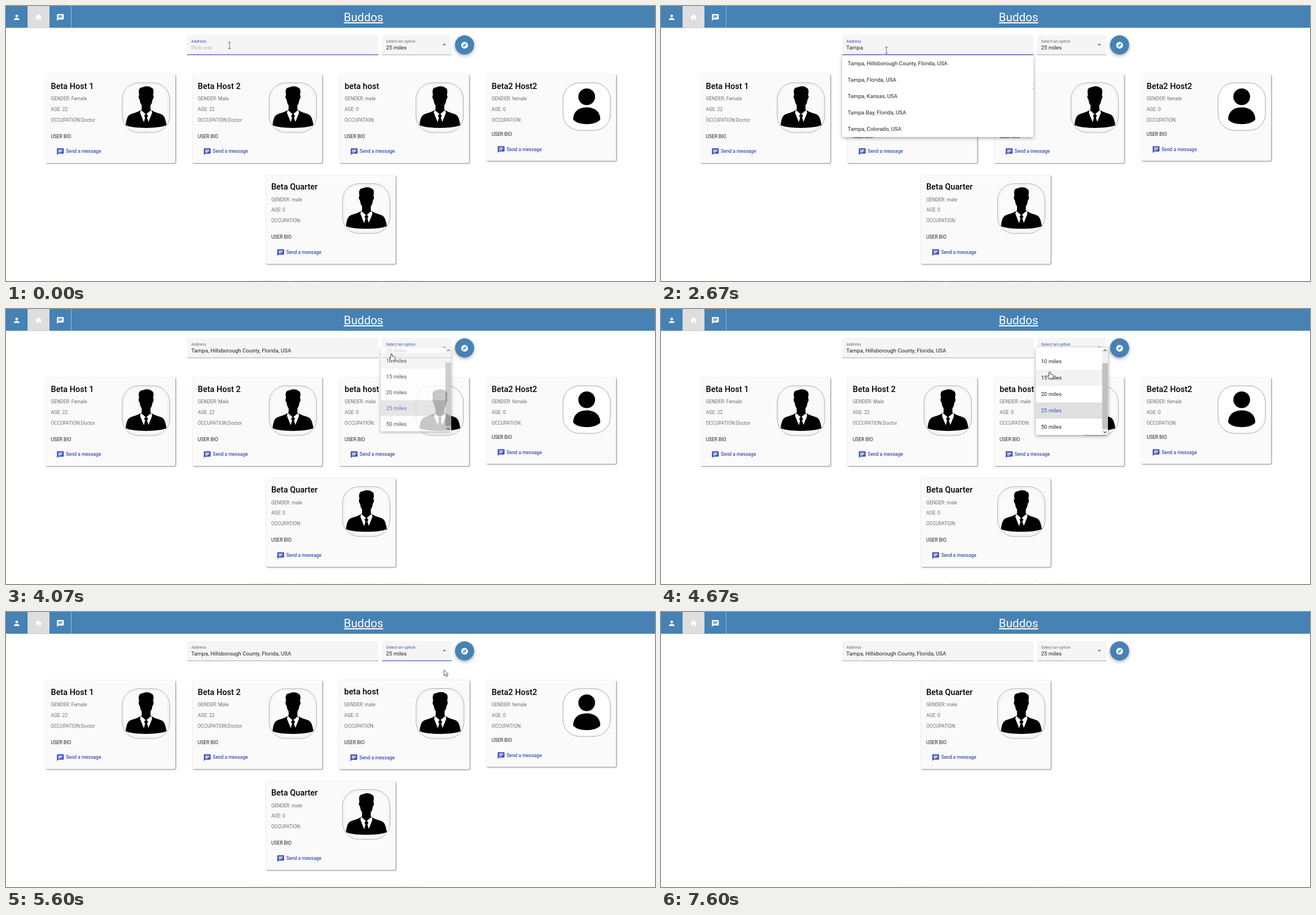
Animation, 1150 px wide and 487 px high, one loop 8190 ms. Source, as an HTML page:

```html
<!DOCTYPE html>
<html lang="en">
<head>
<meta charset="utf-8">
<title>Buddos</title>
<style>
  html, body { margin: 0; width: 100%; height: 100%; overflow: hidden; background: #fff; }
  svg { display: block; font-family: Roboto, sans-serif; }
  text { white-space: pre; }
  .card-bg { filter: drop-shadow(1px 1px 1px rgba(0,0,0,.5)); }
  .raised { filter: drop-shadow(0 2px 3px rgba(0,0,0,.35)); }
</style>
</head>
<body>
<svg id="stage" width="1150" height="487" viewBox="0 0 1150 487">
  <defs>
    <path id="person" d="M12 12c2.21 0 4-1.79 4-4s-1.79-4-4-4-4 1.79-4 4 1.79 4 4 4zm0 2c-2.67 0-8 1.34-8 4v2h16v-2c0-2.66-5.33-4-8-4z"/>
    <path id="home" d="M10 20v-6h4v6h5v-8h3L12 3 2 12h3v8z"/>
    <path id="chat" d="M20 2H4c-1.1 0-2 .9-2 2v18l4-4h14c1.1 0 2-.9 2-2V4c0-1.1-.9-2-2-2zM6 9h12v2H6V9zm8 5H6v-2h8v2zm4-6H6V6h12v2z"/>
    <path id="compass" d="M12 10.9a1.1 1.1 0 1 0 0 2.2 1.1 1.1 0 0 0 0-2.2zM12 2a10 10 0 1 0 0 20 10 10 0 0 0 0-20zm2.19 12.19L6 18l3.81-8.19L18 6l-3.81 8.19z"/>
    <g id="suit">
      <path d="M30 22C28 13 30 8 36 8C41 5 50 6 52 9C56 10 56 16 54.5 22C56.5 23 55.5 28 53.5 30C53 35 51.5 38 50 40V47C55 52 63 53 70 56C76 59 77 68 78.5 75C64 81.5 20 81.5 6 75C7 68 8 59 14 56C21 53 29 52 34.5 47V40C33 38 31.5 35 31 30C29 28 28 23 30 22Z"/>
      <path d="M33 48L42 56L51.5 48L53 53L43 78H41.5L31.5 53Z" fill="#fff"/>
      <path d="M42.3 54.5L45.8 58L44 62L47.5 72L42.3 79L37.5 72L40.5 62L38.8 58Z"/>
    </g>
    <g id="plain">
      <circle cx="42" cy="24.7" r="14.8"/>
      <path d="M18 65C18 51 28 43.5 42 43.5S66 51 66 65C58 76 26 76 18 65Z"/>
    </g>
  </defs>
  <g id="page"></g>
  <g id="addressList" font-size="9.67"></g>
  <g id="menu" font-size="9.67"></g>
  <g id="pointer">
    <path id="arrow" d="M0 0V10.5L2.5 8.3L4.2 12L6 11.2L4.3 7.6H7.6Z" fill="#fff" stroke="#222" stroke-width=".8"/>
    <path id="hand" d="M-1.2 1Q0 -1 1.2 1V4.5L5.5 5.5Q7 6 6.7 8.5L5.5 13H0L-3.8 8Q-3.5 6-1.2 8Z" fill="#fff" stroke="#222" stroke-width=".9"/>
    <path id="beam" d="M-2.3 -5.5H2.3M0 -5.5V5.5M-2.3 5.5H2.3" stroke="#444" stroke-width=".8"/>
  </g>
</svg>
<script>
const LOOP = 8190, STEP = 1000 / 15;
const BLUE = '#3f51b5', STEEL = '#4682b4', INK = 'rgba(0,0,0,.87)', GREY = 'rgba(0,0,0,.56)';
const PLACE = 'Tampa, Hillsborough County, Florida, USA';
const $ = id => document.getElementById(id);
const set = (id, attrs) => { for (const k in attrs) $(id).setAttribute(k, attrs[k]); };
const show = (id, on) => $(id).style.display = on ? '' : 'none';

const text = (x, y, s, size, fill = INK, more = '') =>
  `<text x="${x}" y="${y}" font-size="${size}" fill="${fill}" ${more}>${s}</text>`;
const rect = (x, y, w, h, fill, more = '') =>
  `<rect x="${x}" y="${y}" width="${w}" height="${h}" fill="${fill}" ${more}/>`;
const icon = (name, cx, cy, fill) =>
  `<use href="#${name}" transform="translate(${cx - 7.25} ${cy - 7.25}) scale(.604)" fill="${fill}"/>`;

const CARD_W = 230;
const cards = [
  { x: 70, y: 121, name: 'Beta Host 1', gender: 'Female', age: 22, job: 'Doctor' },
  { x: 330.3, y: 121, name: 'Beta Host 2', gender: 'Male', age: 22, job: 'Doctor' },
  { x: 590.6, y: 121, name: 'beta host', gender: 'male', age: 0, job: '' },
  { x: 851, y: 121, name: 'Beta2 Host2', gender: 'female', age: 0, job: '', plain: true },
  { x: 460.4, y: 299.7, name: 'Beta Quarter', gender: 'male', age: 0, job: '' },
];

function cardMarkup(c, i) {
  const lift = c.plain ? 3.8 : 0, h = 88 - lift;
  c.h = 157 - lift;
  return `<g id="card${i}">` + rect(0, 0, CARD_W, c.h, '#fafafa', 'rx="2" class="card-bg"') +
    text(9.5, 25.8, c.name, 14.5, '#000', 'font-weight="500"') +
    text(9.5, 46, 'GENDER: ' + c.gender, 8.46, GREY) +
    text(9.5, 64.8, 'AGE: ' + c.age, 8.46, GREY) +
    text(9.5, 83.6, 'OCCUPATION:' + c.job, 8.46, GREY) +
    text(9.5, 112.6 - lift, 'USER BIO', 8.46) +
    icon('chat', 26.3, 137 - lift, BLUE) +
    text(36, 139.4 - lift, 'Send a message', 8.46, BLUE, 'font-weight="500"') +
    '<g transform="translate(136 15)">' +
    rect(0, 0, 84, h, '#fff', 'rx="29" stroke="#8c8c9c" stroke-width=".8"') +
    (c.plain ? '' : rect(2.5, 2.5, 79, h - 5, '#fafafa', 'rx="27" stroke="#e2e2ee" stroke-width=".8"')) +
    `<use href="#${c.plain ? 'plain' : 'suit'}"/></g></g>`;
}

const field = (id, x, w, label) =>
  `<path d="M${x} 87V53.5q0-2.5 2.5-2.5h${w - 5}q2.5 0 2.5 2.5V87z" fill="#f5f5f5"/>` +
  rect(x, 86, w, .8, '#949494') + rect(x, 85.8, w, 1.2, BLUE, `id="${id}Line"`) +
  text(x + 7.2, 64.8, label, 7.25, GREY, `id="${id}Label"`);

$('page').innerHTML =
  rect(0, 0, 1150, 38.6, STEEL) + rect(38.5, 0, 38.5, 38.6, '#dedede') +
  rect(38, 0, .7, 38.6, '#c8d6e2') + rect(115.2, 0, .7, 38.6, '#c8d6e2') +
  icon('person', 19, 20, '#fff') + icon('home', 57.7, 20, '#fff') + icon('chat', 96.3, 20.4, '#fff') +
  text(633.5, 26.7, 'Buddos', 20.6, '#fff', 'text-anchor="middle" text-decoration="underline"') +
  field('address', 321, 339, 'Address') + text(328.3, 76.8, '', 9.67, INK, 'id="address"') +
  rect(0, 68, .7, 11, '#000', 'id="caret"') +
  field('select', 666.4, 123, 'Select an option') + text(673.4, 77.3, '25 miles', 9.67) +
  '<path d="M773.7 67.2h6l-3 3z" fill="#6b6b6b"/>' +
  `<circle cx="812.6" cy="69" r="16.9" fill="${STEEL}" class="raised"/>` +
  icon('compass', 812.6, 69.5, '#fff') + '<circle id="ripple" cx="812.6" cy="69" r="16.9" fill="#fff"/>' +
  cards.map(cardMarkup).join('') +
  [0, 1, 2, 3].map(i => rect(427 + i * 80.3, 485.6, 75, 3, '#f4f4f4') +
    rect(456 + i * 80.3, 486.2, 18, 3, '#e8e8e8')).join('');

const ROW = 29;
const places = [PLACE, 'Tampa, Florida, USA', 'Tampa, Kansas, USA',
  'Tampa Bay, Florida, USA', 'Tampa, Colorado, USA'];
$('addressList').innerHTML = rect(321, 87, 339, ROW * 5, '#fff', 'rx="2" class="raised"') +
  rect(321, 87, 339, ROW, 'rgba(0,0,0,.04)', 'id="placeHover"') +
  places.map((s, i) => text(330.7, 105 + i * ROW, s, 9.67)).join('');

const MENU_TOP = 68, MENU_H = 155, FIRST_ROW = -18.6;
$('menu').innerHTML = rect(0, 0, 128, MENU_H, '#fff', 'id="menuBg" rx="2" class="raised"') +
  `<svg id="menuView" height="${MENU_H}">` +
  rect(0, 0, 140, ROW, 'rgba(0,0,0,.05)', 'id="menuHover"') +
  rect(0, FIRST_ROW + 4 * ROW, 140, ROW, '#000', 'id="menuChosen"') +
  [5, 10, 15, 20, 25, 50].map((n, i) =>
    text(9.4, FIRST_ROW + i * ROW + 18, n + ' miles', 9.67, n === 25 ? BLUE : INK)).join('') +
  '<g id="bar">' + rect(0, 0, 10.3, MENU_H, '#f1f1f1') + rect(0, 28, 10.3, 116.5, '#c1c1c1') +
  '<path d="M2.8 6.5l2.3-2.3 2.3 2.3M2.8 149l2.3 2.3 2.3-2.3" fill="none" stroke="#505050" stroke-width="1.2"/></g></svg>';

// Pointer hot spot: time, x, y
const path = [
  [0, 396, 70], [2470, 396, 70], [3000, 407, 97], [3340, 407, 97], [3930, 683, 79],
  [4400, 683, 79], [5070, 699, 170], [5300, 699, 170], [5800, 818, 66], [6140, 818, 66],
  [6340, 852, 92], [7000, 12, 294], [7300, 8, 380], [7600, 28, 492], [LOOP, 28, 492],
];
function pointerAt(t) {
  const i = Math.max(1, path.findIndex(p => p[0] > t));
  const [t0, x0, y0] = path[i - 1], [t1, x1, y1] = path[i];
  const u = Math.max(0, (t - t0) / (t1 - t0)), e = u * u * (3 - 2 * u);
  return [x0 + (x1 - x0) * e, y0 + (y1 - y0) * e];
}
const within = ([px, py], x, y, w, h) => px >= x && px < x + w && py >= y && py < y + h;
const between = (t, a, b) => t >= a - 5 && t < b - 5;

function focusLine(id, on, x, w, scale = 1) {
  show(id + 'Line', on);
  set(id + 'Line', { x: x + w * (1 - scale) / 2, width: w * scale });
  set(id + 'Label', { fill: on ? BLUE : GREY });
}

function drawAddress(t, listOpen) {
  const keys = [600, 930, 1070, 1330, 1470].filter(k => t >= k - 5).length;
  const chosen = t >= 3055;
  set('address', { fill: keys ? INK : 'rgba(0,0,0,.25)' });
  $('address').textContent = chosen ? PLACE : keys ? PLACE.slice(0, keys) : 'Pick one';
  show('caret', between(t, 600, 1670) || between(t, 3130, 3600));
  set('caret', { x: 328.5 + $('address').getComputedTextLength() });
  const grow = chosen ? 1 - .5 * (1 - Math.min(1, Math.max(0, (t - 3108) / 300))) ** 3 : 1;
  focusLine('address', t < 3055 || between(t, 3130, 3930), 321, 339, grow);
  show('addressList', listOpen);
}

function drawMenu(t, py) {
  const open = between(t, 4070, 5270), p = between(t, 4070, 4130) ? .8 : 1;
  const width = 113 + 15 * p, sy = .8 + .2 * p;
  show('menu', open);
  set('menu', { transform: `translate(664 ${MENU_TOP}) scale(1 ${sy})`, opacity: p < 1 ? .78 : t > 5190 ? .9 : 1 });
  set('menuBg', { width });
  set('menuView', { width });
  set('bar', { transform: `translate(${width - 10.3} 0)` });
  const row = Math.floor(((py - MENU_TOP) / sy - FIRST_ROW) / ROW);
  set('menuHover', { y: FIRST_ROW + Math.max(1, row) * ROW });
  set('menuChosen', { opacity: t > 5060 ? .2 : .12 });
  focusLine('select', between(t, 3930, 5870), 666.4, 123);
}

function drawCards(t) {
  const found = t >= 5925;
  cards.forEach((c, i) => {
    const y = found ? 121 : c.y;
    show('card' + i, !found || i === 4);
    let hover = 0;
    for (let n = 0; n < 4; n++) {
      const past = t - n * STEP;
      if (past > 5190 && within(pointerAt(past), c.x, y, CARD_W, c.h)) hover += .25;
    }
    const s = 1 + .01 * hover, off = (1 - s) / 2;
    set('card' + i, { transform: `translate(${c.x + CARD_W * off} ${y + c.h * off}) scale(${s})` });
  });
}

function draw(t) {
  const at = pointerAt(t), listOpen = between(t, 2130, 3060);
  drawAddress(t, listOpen);
  show('placeHover', within(at, 321, 87, 339, ROW));
  drawMenu(t, at[1]);
  drawCards(t);
  set('ripple', { opacity: t < 5860 ? 0 : Math.min(.25, Math.max(0, (6400 - t) / 1300)) });

  const menuHit = between(t, 4070, 5200) && within(at, 664, 68, 128, MENU_H);
  const onButton = Math.hypot(at[0] - 812.6, at[1] - 69) < 17;
  const kind = within(at, 321, 51, 339, 36) ? 'beam'
    : menuHit || onButton || within(at, 666, 51, 123, 36) ||
      listOpen && within(at, 321, 87, 339, ROW * 5) ? 'hand' : 'arrow';
  for (const k of ['arrow', 'hand', 'beam']) show(k, k === kind);
  set('pointer', { transform: `translate(${at})` });
}

const start = performance.now();
function tick() {
  const t = (performance.now() - start) % LOOP;
  draw(Math.floor((t + 4) / STEP) * STEP);
  requestAnimationFrame(tick);
}
tick();
</script>
</body>
</html>
```
